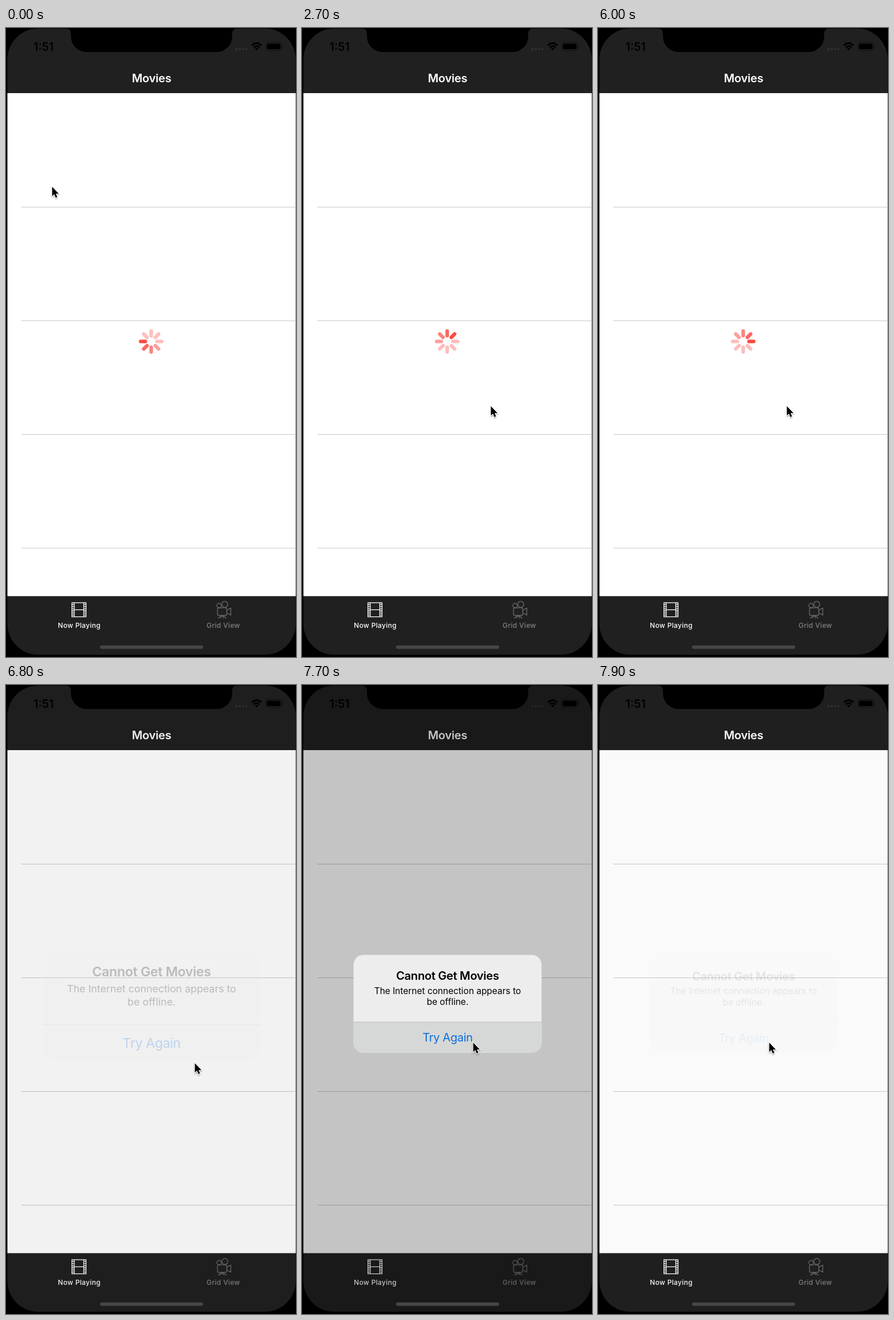
Animation of 509x1101 px, one loop 8 s. Source, as an HTML page:

```html
<!DOCTYPE html>
<html lang="en">
<head>
<meta charset="utf-8">
<title>Movies</title>
<style>
  html, body { margin: 0; width: 100%; height: 100%; overflow: hidden; background: #000; }
  svg { display: block; width: 100%; height: 100%; }
  text { font-family: Inter, Roboto, "Liberation Sans", sans-serif; text-anchor: middle; }
  .head { font-size: 20.2px; font-weight: 600; letter-spacing: -.3px; }
  .action { font-size: 20.2px; letter-spacing: -.35px; fill: #0a6fe0; }
  .note { font-size: 15.5px; }
  .tab { font-size: 12px; font-weight: 500; letter-spacing: .35px; }
</style>
</head>
<body>
<svg viewBox="0 0 509 1101" preserveAspectRatio="none">
  <defs>
    <clipPath id="screen">
      <path d="M2.5 55A54 54 0 0 1 56.5 1H106Q114 1.500 114 9.500V15A27 27 0 0 0 141 42H370A27 27 0 0 0 397 15V9.500Q397 1.500 405 1H454.500A54 54 0 0 1 508.500 55V1043A54 54 0 0 1 454.500 1097H56.500A54 54 0 0 1 2.500 1043Z"/>
    </clipPath>
    <clipPath id="card"><rect x="90.500" y="472.500" width="330" height="171" rx="17"/></clipPath>
    <filter id="soft" x="-60%" y="-40%" width="220%" height="200%">
      <feDropShadow dx="0" dy="1.500" stdDeviation="1.300" flood-opacity=".4"/>
    </filter>
  </defs>

  <g clip-path="url(#screen)">
    <rect width="509" height="1101" fill="#202020"/>
    <rect y="114" width="509" height="880.500" fill="#fff"/>
    <g id="rows" fill="#c8c8c8"></g>

    <!-- status bar -->
    <text x="66" y="39.500" font-size="20" font-weight="600">1:51</text>
    <g fill="#323232">
      <circle cx="404" cy="37" r="1.900"/><circle cx="410" cy="37" r="1.900"/>
      <circle cx="416" cy="37" r="1.900"/><circle cx="422" cy="37" r="1.900"/>
    </g>
    <g fill="none" stroke="#000" stroke-width="3">
      <path d="M431.500 30.500Q440 22.500 448.500 30.500"/>
      <path d="M434.800 34Q440 29.300 445.200 34"/>
    </g>
    <path d="M437 36.200Q440 33.700 443 36.200L440 39.300Z"/>
    <rect x="456" y="25.500" width="28" height="13.500" rx="4" fill="none" stroke="#0f0f0f" stroke-width="1.100"/>
    <rect x="458" y="27.500" width="24" height="9.500" rx="2.300"/>
    <path d="M485.800 30Q488.200 32.200 485.800 34.700Z" fill="#0f0f0f"/>

    <text class="head" x="255.500" y="94.500" fill="#fff">Movies</text>

    <!-- tab bar -->
    <g fill="none" stroke="#fff" stroke-width="1.300">
      <rect x="115.700" y="1006" width="24.800" height="24.600"/>
      <path d="M119.700 1006V1030.600M136.500 1006V1030.600M119.700 1018.300H136.500"/>
      <path d="M117.700 1008.500V1030M138.500 1008.500V1030" stroke-width="4" stroke-dasharray="1.300 2.400"/>
    </g>
    <text class="tab" x="128.500" y="1050.200" fill="#fff">Now Playing</text>
    <g fill="none" stroke="#707070" stroke-width="1.200">
      <circle cx="374" cy="1011" r="3.900"/>
      <circle cx="384" cy="1009" r="5.300"/>
      <rect x="371.200" y="1015" width="16.300" height="13.200" rx="2.500"/>
      <path d="M387.500 1019L394.500 1015.500V1027.500L387.500 1024M378 1028.500L372.500 1033.200M381 1028.500L386.500 1033.200M379.500 1028.500L376.500 1033M379.500 1028.500L382.500 1033"/>
    </g>
    <text class="tab" x="381.500" y="1050.200" fill="#808080">Grid View</text>

    <g id="spinner" stroke-width="6.300" stroke-linecap="round"></g>
    <rect id="dim" width="509" height="1101"/>

    <g id="alert">
      <g clip-path="url(#card)">
        <rect x="90" y="472" width="331" height="172" fill="#ededed"/>
        <rect id="press" x="90" y="590" width="331" height="54" fill="#d6d8d7"/>
        <rect x="90" y="589.500" width="331" height="1" fill="#bcbcbc"/>
      </g>
      <text class="head" x="255.500" y="516.500">Cannot Get Movies</text>
      <text class="note" x="255.500" y="541">The Internet connection appears to</text>
      <text class="note" x="255.500" y="560.500">be offline.</text>
      <text class="action" x="255.500" y="624.500">Try Again</text>
    </g>

    <rect x="165" y="1080.800" width="181" height="6" rx="3" fill="#464646"/>
  </g>

  <g id="cursor">
    <path d="M0 0V16.300L3.700 12.900L6.200 19L9 17.800L6.500 11.900H11.500Z" stroke="#fff" stroke-width="1.800" paint-order="stroke" filter="url(#soft)"/>
  </g>
</svg>

<script>
const LOOP = 8000, TICK = 100;
const SHOW = 6750, PRESS = 7700, HIDE = 7710;
const MAX_DIM = 0.231;
const PETALS = ['#fb4b42', '#fb6962', '#fc857f', '#fca19d'];
const IDLE = '#fdbfbd';
// time, x, y of the pointer tip
const STOPS = [
  [0, 81, 278], [100, 81, 278], [900, 331.5, 662],
  [7100, 331.5, 662], [7650, 300.5, 626], [LOOP, 300.5, 626]
];

const $ = id => document.getElementById(id);
const [spinner, dim, alertBox, press, cursor] =
  ['spinner', 'dim', 'alert', 'press', 'cursor'].map($);

function add(parent, tag, attrs) {
  const el = document.createElementNS(parent.namespaceURI, tag);
  for (const key in attrs) el.setAttribute(key, attrs[key]);
  return parent.appendChild(el);
}

for (let i = 0; i < 4; i++) {
  add($('rows'), 'rect', { x: 27, y: Math.floor(313.2 + i * 199.2), width: 482, height: 1 });
}

const petals = Array.from({ length: 8 }, (_, i) => add(spinner, 'path', {
  d: 'M0 -10.300V-18.400',
  transform: `translate(254.800 548.700) rotate(${i * 45})`
}));

const smooth = u => u * u * (3 - 2 * u);

// critically damped spring, 0 to 1
function spring(ms, rate) {
  const x = Math.max(0, ms) / 1000 * rate;
  return 1 - (1 + x) * Math.exp(-x);
}

function pointerAt(t) {
  const i = STOPS.findIndex(stop => stop[0] > t);
  const [t0, x0, y0] = STOPS[i - 1], [t1, x1, y1] = STOPS[i];
  const u = smooth((t - t0) / (t1 - t0));
  return [x0 + (x1 - x0) * u, y0 + (y1 - y0) * u];
}

function draw(t) {
  const head = 6 + t / TICK;
  petals.forEach((petal, i) => {
    petal.setAttribute('stroke', PETALS[(head - i + 8) % 8] || IDLE);
  });
  spinner.style.display = t < SHOW ? '' : 'none';

  const opened = spring(t - SHOW, 18);
  const shown = opened * (1 - spring(t - HIDE, 21.6));
  const scale = 1.2 - 0.2 * opened;
  dim.setAttribute('opacity', MAX_DIM * shown);
  alertBox.setAttribute('opacity', shown);
  alertBox.setAttribute('transform',
    `translate(255.5 558) scale(${scale}) translate(-255.5 -558)`);
  press.style.display = t === PRESS ? '' : 'none';

  cursor.setAttribute('transform', `translate(${pointerAt(t)})`);
}

function frame() {
  draw(Math.floor(performance.now() % LOOP / TICK) * TICK);
  requestAnimationFrame(frame);
}
frame();
</script>
</body>
</html>
```
